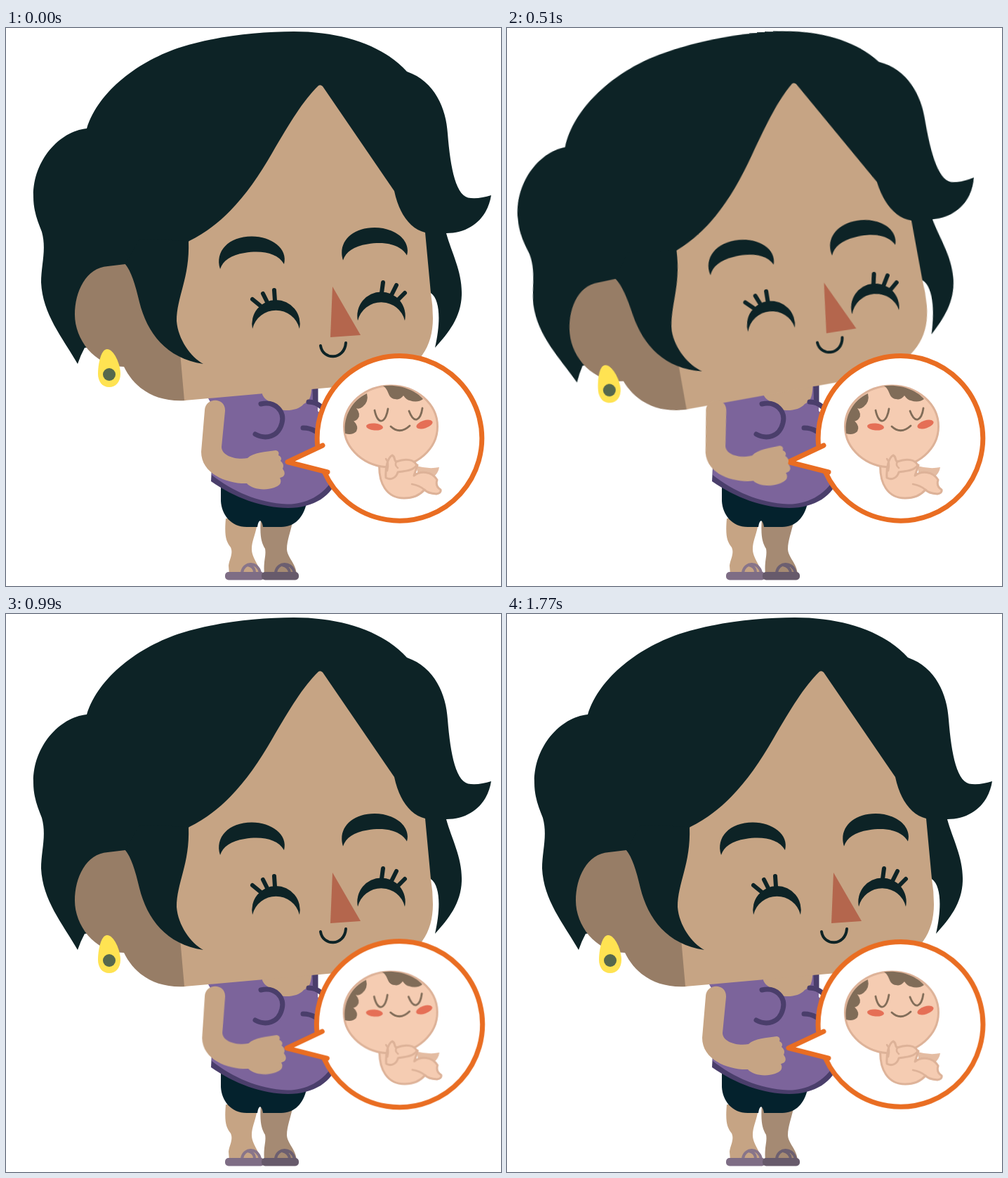
Animation, 705 px wide and 794 px high, one loop 1800 ms. Source, as an HTML page:

```html
<!DOCTYPE html>
<html lang="en">
<head>
<meta charset="utf-8">
<title>Expecting</title>
<style>
  html, body { margin: 0; width: 100%; height: 100%; overflow: hidden; background: #fff; }
  svg { display: block; width: 705px; height: 794px; }

  .hair { fill: #0d2326; }
  .skin { fill: #c6a484; }
  .shade { fill: #977d66; }
  .line { fill: none; stroke-linecap: round; stroke-linejoin: round; }
  .lash { stroke: #0d2326; stroke-width: 6; }
  .seam { stroke: #4a3e6b; stroke-width: 7; }
  .rim { stroke: #e96d22; stroke-width: 7; }
  .baby { fill: #f5ccb2; stroke: #ddb298; stroke-width: 3; stroke-linejoin: round; }
  .fuzz { fill: #806c58; }
  .feature { stroke: #806c58; stroke-width: 2.8; }
  .cheek { fill: #e56f56; }

  #head, #arm, #bubble, #babyHead, .babyBody {
    animation: 1800ms cubic-bezier(.333, 0, .667, 1) infinite;
  }
  #head { transform-origin: 396px 517px; animation-name: tilt; }
  #arm { transform-origin: 298px 540px; animation-name: rub; }
  #bubble { transform-origin: 561px 584px; animation-name: swell; }
  #babyHead { transform-origin: 548px 567px; animation-name: nod; }
  .babyBody { transform-origin: 556px 620px; animation-name: kick; }

  @keyframes tilt {
    0%, 50%, 100% { transform: rotate(0deg); }
    25% { transform: rotate(-5.4deg); }
  }
  @keyframes rub {
    0%, 16.667%, 50%, 83.333%, 100% { transform: rotate(0deg); }
    33.333%, 66.667% { transform: rotate(-5.4deg); }
  }
  @keyframes swell {
    0%, 50%, 100% { transform: scale(1); }
    75% { transform: scale(1.065); }
  }
  @keyframes nod {
    0%, 50%, 100% { transform: translate(0, 0) rotate(0deg); }
    75% { transform: translate(-3px, 0) rotate(-9deg); }
  }
  @keyframes kick {
    0%, 50%, 100% { transform: translate(0, 0) rotate(0deg); }
    75% { transform: translate(2.5px, -1px) rotate(-8deg); }
  }
</style>
</head>
<body>
<svg viewBox="0 0 705 794">
  <defs>
    <path id="brow" d="M305 343C297 318 317 296.500 350 296.500C378 296.500 402 314 396 336C387 320 364 316 340 320C320 323 309 331 305 343Z"/>
    <path id="lid" d="M351 428A34.200 34.200 0 1 1 418 428A34.500 34.500 0 0 0 351 428Z"/>
  </defs>

  <g id="legs">
    <path class="skin" d="M313 698C311 722 313 730 320 739C324 748 318 756 317 765L318 778H363C361 764 350 754 350 742C350 728 356 722 359 698Z"/>
    <path fill="#a58a73" d="M363 698C361 724 364 732 369 741C371 752 366 758 368 778H414C413 762 401 754 400 742C400 728 406 716 409 698Z"/>
    <g class="line" stroke-width="4">
      <path stroke="#88758a" d="M336 775C338 760 358 758 362 775M344 764Q354 766 354 775"/>
      <path stroke="#6c5f70" d="M384 775C386 760 406 758 411 775M393 764Q403 766 404 775"/>
    </g>
    <rect x="312" y="774" width="56" height="11.500" rx="5" fill="#7e6d85"/>
    <rect x="364" y="774" width="53" height="11.500" rx="5" fill="#675a6b"/>
    <path fill="#04222d" d="M306 640V673C307 692 320 710 343 710H358Q359 702 362 701Q365 703 366 710H392C411 710 424 696 428 676L432 640Z"/>
  </g>

  <g id="shirt">
    <path fill="#4a3e6b" d="M293 625L292 645C325 668 365 683 402 683C438 683 466 665 471 640Z"/>
    <path fill="#7c649b" d="M288 500H444V545C470 565 476 610 468 638C452 667 425 678 400 677.500C360 676 322 659 293 636L298 545L288 527Z"/>
    <path class="skin" d="M365 500V521C369 532 379 530 383 540C392 546 415 546 424 535C434 530 435 524 436 500Z"/>
    <path fill="#4a3e6b" d="M436 500H444.500V533L437 529Z"/>
    <path class="line seam" d="M363 535C384 530 397 546 393 562C388 582 370 586 355 578M431 532Q441 532 449 539M423 569Q433 569 441 574"/>
  </g>

  <g id="head">
    <path class="hair" d="M115 143C132 89 190 46 250 27C302 11 360 5 410 5C480 5 539 26 571 62C611 76 627 115 629 150C633 200 641 242 662 242Q676 243 691 238C686 270 662 292 627 292C635 321 650 347 649 380C648 412 630 434 611 455C619 420 619 387 605 377L560 300L240 440L112 455Q106 466 102 478C80 440 52 407 50 362C50 337 58 315 51 290C45 275 39 260 39 240C38 190 75 147 115 143Z"/>
    <path class="shade" d="M170 336L145 339C114 341 98 375 98 408C98 442 125 481 168 482C182 511 211 533 256 530L275 460Z"/>
    <path class="skin" d="M445 82Q448 80 451 83L553 232C560 265 576 286 597 291L605 377Q608 395 608 413C608 470 570 506 480 510L254 530L248 462L236 420L240 320L261 303C312 278 348 232 379 178C406 132 422 105 445 82Z"/>
    <path class="hair" d="M260 303C262 356 243 382 243 417C245 443 263 468 281 478C228 470 201 434 190 390C184 364 178 346 170 336L190 300Z"/>

    <g class="hair">
      <use href="#brow"/>
      <use href="#brow" x="175" y="-12.500"/>
      <use href="#lid"/>
      <use href="#lid" x="150" y="-11.500"/>
    </g>
    <path class="line lash" d="M351 386L362 395M366 378L372 390M382 373L383 388M537 362L535 377M556 366L549 380M568 377L557 388"/>
    <path fill="#b4664d" d="M465 368L505 437L462 440Z"/>
    <path class="line" stroke="#0d2326" stroke-width="4" d="M448 452C451 473 482 473 484 448"/>

    <path fill="#ffe352" d="M144 457C154 457 163 479 163 492C163 504 156 511 147 511C137 511 131 503 131 492C131 479 135 457 144 457Z"/>
    <circle cx="147" cy="493" r="9" fill="#56684d"/>
  </g>

  <g id="bubble">
    <circle cx="560.500" cy="584" r="117.300" fill="#fff"/>
    <path fill="#fff" d="M452 594L401 617.500L458 632L470 612Z"/>
    <path class="line rim" d="M453.500 632A117.300 117.300 0 1 0 443.500 593"/>
    <path class="line rim" d="M451 594L401 617.500L458 632"/>
  </g>

  <g class="babyBody">
    <path fill="#e4bca2" d="M584 623Q602 628 617 625Q616 633 608 640L588 640Z"/>
    <path class="baby" d="M532 615C529 649 543 669 567 669C580 669 590 664 596 657Q600 662 613 663Q620 662 619 657Q611 652 614 643C606 630 590 630 581 637L586 622Z"/>
    <path class="line" stroke="#ddb298" stroke-width="2.500" d="M596 657Q589 651 578 649"/>
  </g>

  <g id="babyHead">
    <ellipse class="baby" cx="548" cy="567" rx="66.500" ry="58"/>
    <path class="fuzz" d="M537 509.500C560 506 584 516 594 528Q586 534 575 530Q571 530 566 523Q561 530 554 528C543 527 546 514 537 509.500Z"/>
    <path class="fuzz" d="M483 577C480 552 493 530 514 520Q517 532 508 539Q503 543 499 541Q506 550 501 556Q498 560 495 559Q503 567 499 574Q493 580 483 577Z"/>
    <path class="line feature" d="M525 544C527 554 531 560 535 559C540 558 543 549 544 542M574 545C577 553 581 558 585 557C590 555 592 548 593 541M548 567Q561 579 575 566"/>
    <ellipse class="cheek" cx="525" cy="567.500" rx="12" ry="5" transform="rotate(5 525 567.500)"/>
    <ellipse class="cheek" cx="596" cy="564" rx="12" ry="5.500" transform="rotate(-18 596 564)"/>
  </g>

  <g class="babyBody">
    <path class="baby" d="M541 640C540 625 544 611 550 608C555 610 552 616 556 617C570 612 581 614 585 622C579 631 567 630 558 632C556 640 548 644 541 640Z"/>
    <path class="line" stroke="#ddb298" stroke-width="2.500" d="M543 630Q546 618 541 613M556 617Q553 622 558 626"/>
  </g>

  <g id="arm">
    <path class="skin" d="M283 544C284 525 313 525 312 545L307 596C307 609 328 615 344 612C352 604 370 603 384 601Q390 602 388 608Q394 611 391 616Q397 621 394 627Q399 634 395 638Q391 640 390 640Q395 650 382 654C368 659 350 656 343 648C316 649 278 635 278 603Z"/>
  </g>
</svg>
</body>
</html>
```
